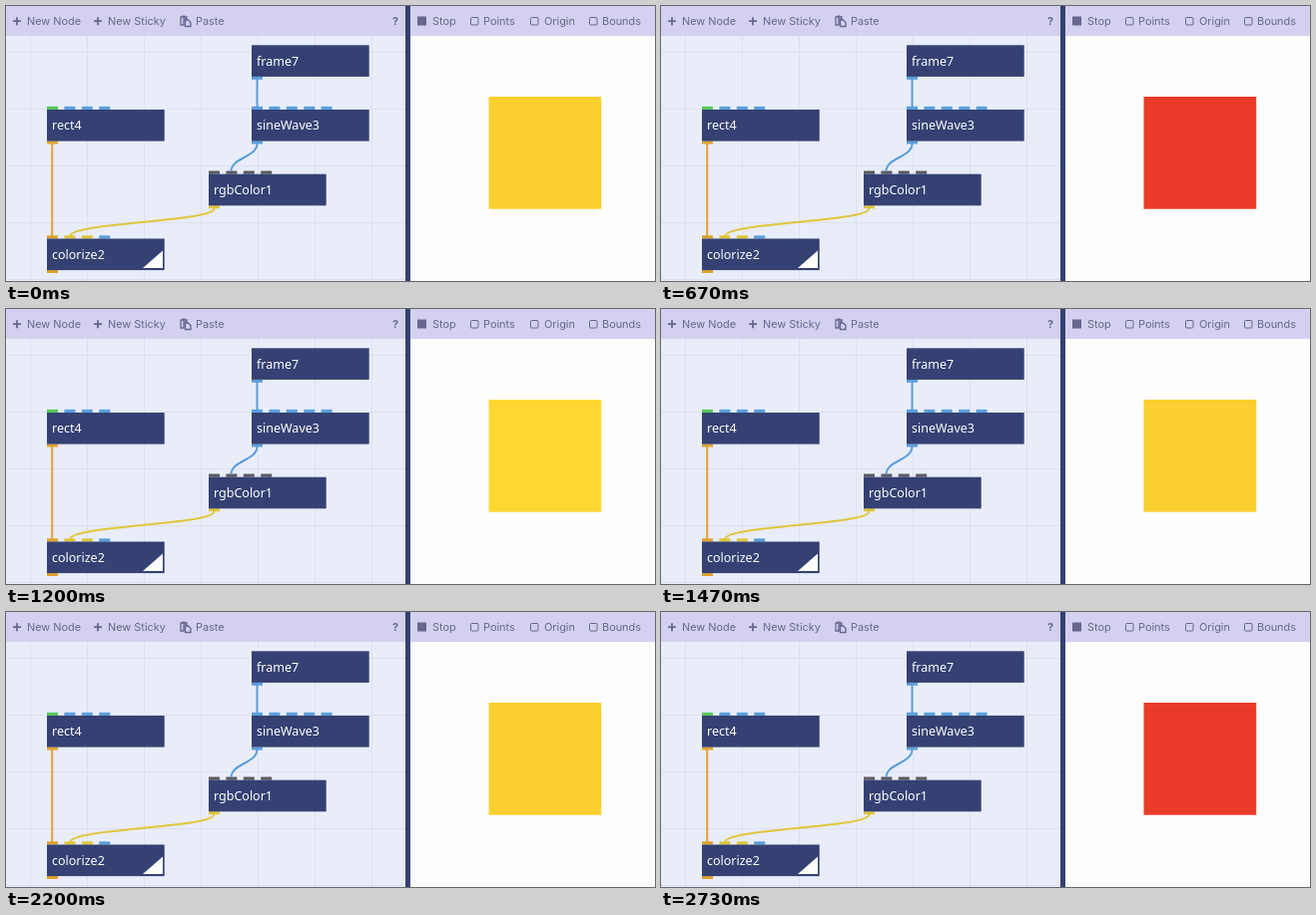
An HTML page that plays this animation: 650x276 px, repeating every 2790 ms.

```html
<!DOCTYPE html>
<html lang="en">
<head>
<meta charset="utf-8">
<title>Node editor</title>
<style>
  html, body { margin: 0; width: 100%; height: 100%; overflow: hidden; background: #fff; }
  svg { display: block; width: 100vw; height: 100vh; }
  .bar { font: 400 10.9px Inter, sans-serif; fill: #68658f; }
  .name { font: 500 12.5px "Noto Sans", sans-serif; fill: #fff; }
  .wire { fill: none; stroke-width: 2; }
</style>
</head>
<body>
<svg id="stage" viewBox="0 0 650 276"></svg>
<script>
const NS = 'http://www.w3.org/2000/svg';
const stage = document.getElementById('stage');
const NAVY = '#344172', INK = '#68658f';
const BLUE = '#5a9fdc', ORANGE = '#e0a22c', YELLOW = '#dfc63a', GREEN = '#55c65a', GRAY = '#5b5b60';

function add(tag, attrs, text) {
  const el = document.createElementNS(NS, tag);
  for (const key in attrs) el.setAttribute(key, attrs[key]);
  if (text) el.textContent = text;
  return stage.appendChild(el);
}
const rect = (x, y, width, height, fill) => add('rect', { x, y, width, height, fill });
const path = (d, attrs) => add('path', { d, fill: 'none', ...attrs });
const label = (x, text) => add('text', { x, y: 19, class: 'bar' }, text);
const wire = (d, stroke) => path(d, { stroke, class: 'wire' });
const plus = x => path(`M${x} 15.2h8m-4 -4v8`, { stroke: INK, 'stroke-width': 1.8 });

function node(x, y, name, inputs, output) {
  inputs.forEach((color, i) => rect(x + i * 17.4, y - 3.2, 11, 3.2, color));
  rect(x, y + 31.5, 11, 3, output);
  rect(x, y, 117.7, 31.6, NAVY);
  add('text', { x: x + 5, y: y + 20.3, class: 'name' }, name);
}

function drawGraph() {
  rect(0, 0, 400, 276, '#e9edfa');
  for (let x = 24.5; x < 400; x += 57) rect(x - 0.5, 30, 1, 246, '#dce0f1');
  for (let y = 46.5; y < 276; y += 57) rect(0, y - 0.5, 400, 1, '#dce0f1');

  node(246, 39.3, 'frame7', [], BLUE);
  node(41, 104, 'rect4', [GREEN, BLUE, BLUE, BLUE], ORANGE);
  node(246, 104, 'sineWave3', Array(5).fill(BLUE), BLUE);
  node(203, 168.7, 'rgbColor1', Array(4).fill(GRAY), YELLOW);
  node(41, 233.5, 'colorize2', [ORANGE, YELLOW, YELLOW, BLUE], ORANGE);
  path('M157 245.5V263H137Z', { fill: '#fff' });

  wire('M251.5 73V102', BLUE);
  wire('M251.5 138C251.5 152 225.5 152 225.5 166', BLUE);
  wire('M46.2 138V231', ORANGE);
  wire('M208.5 203C208.5 217 64 217 64 231', YELLOW);
}

function drawBars() {
  rect(0, 0, 650, 30, '#d4d1f0');
  plus(7);
  label(21, 'New Node');
  plus(88);
  label(102, 'New Sticky');
  path('M175 11h6v2h-3v6h-3zM179.5 14h3l2.5 2.5v4h-5.500z', { stroke: INK, 'stroke-width': 1.3 });
  path('M176.500 10.500h3', { stroke: INK, 'stroke-width': 2 });
  label(190, 'Paste');
  label(387, '?').style.fontWeight = 700;
  rect(400, 0, 5, 276, NAVY);

  rect(412, 10.5, 9, 9, INK);
  label(427, 'Stop');
  [[465, 478, 'Points'], [525, 539, 'Origin'], [584, 597, 'Bounds']].forEach(([x, tx, text]) => {
    add('rect', { x: x + 0.5, y: 11.5, width: 7.5, height: 7.5, rx: 1, fill: 'none', stroke: INK });
    label(tx, text);
  });
}

drawGraph();
rect(405, 30, 245, 246, '#fefefe');
drawBars();
const swatch = rect(483.5, 91, 112.7, 112.7, '#fbcf2b');

// Green follows a clipped sine, sampled 15 times a second.
const LOOP = 2790, RATE = 15, PERIOD = 16.5, PEAK = 2.75;

function update(ms) {
  const step = Math.floor((ms % LOOP + 4) * RATE / 1000) % 42;
  const wave = 0.06 + 1.78 * Math.cos(2 * Math.PI * (step - PEAK) / PERIOD);
  const v = Math.min(1, Math.max(0, wave));
  const rgb = [234 + 21 * v ** 4, 59 + 156 * v, 40 + 9 * v ** 4].map(Math.round);
  swatch.setAttribute('fill', `rgb(${rgb})`);
}

const start = performance.now();
function tick(now) {
  update(Math.max(0, now - start));
  requestAnimationFrame(tick);
}
update(0);
requestAnimationFrame(tick);
</script>
</body>
</html>
```
